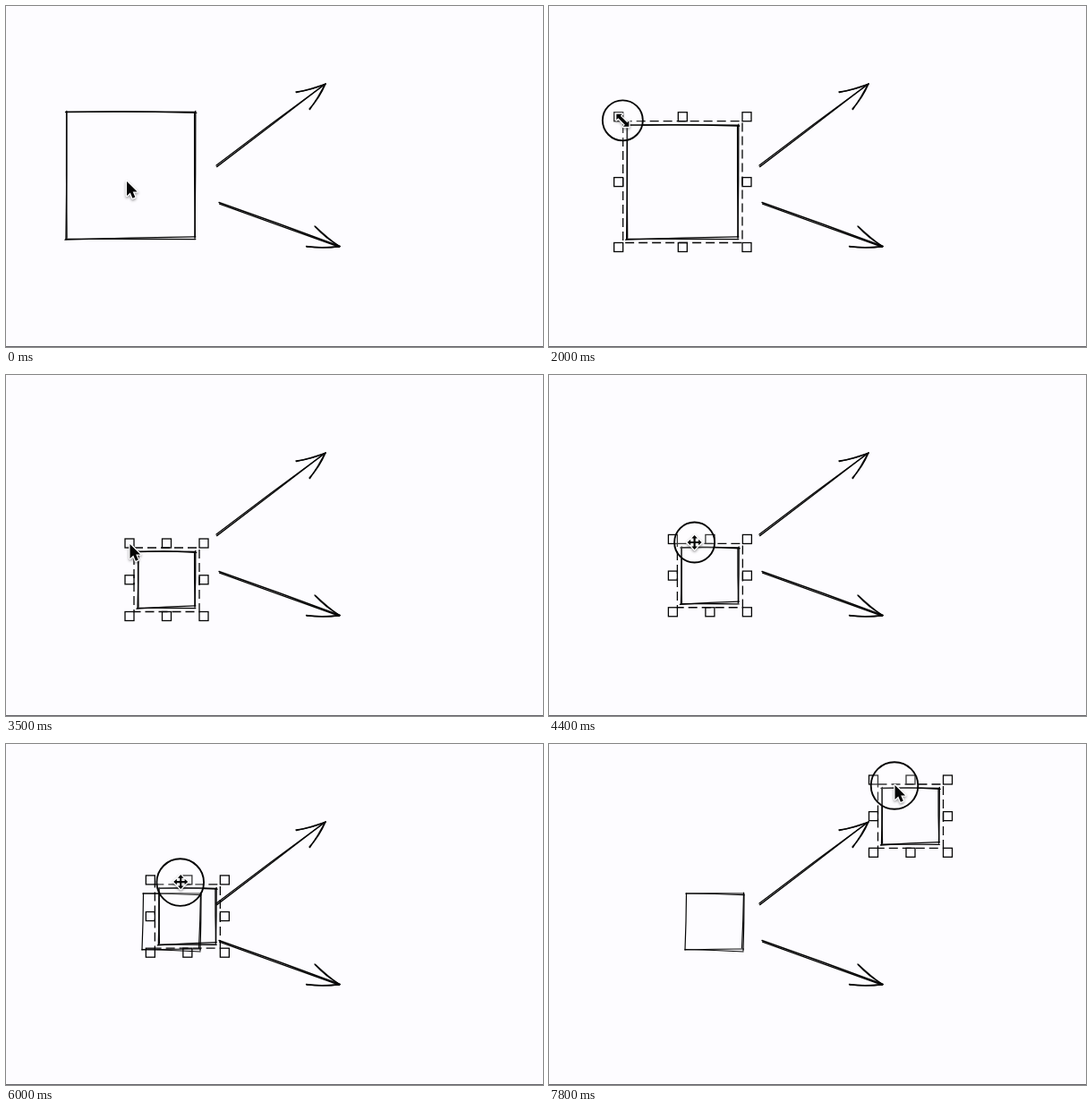
Write an HTML page with a canvas that moves like this. It is 600 px wide and 381 px high and loops after 8 s.

```html
<!DOCTYPE html>
<html lang="en">
<head>
<meta charset="utf-8">
<title>Sketch editor</title>
<style>
html, body { margin: 0; width: 100%; height: 100%; overflow: hidden; background: #fdfcff; }
canvas { display: block; width: 600px; height: 381px; }
</style>
</head>
<body>
<canvas id="stage" width="600" height="381"></canvas>
<script>
const ctx = document.getElementById('stage').getContext('2d');
const LOOP = 8000, STEP = 100, LAG = 35;
const PAPER = '#fdfcff', INK = '#050505';

// Pointer moves: leave and arrive in ms, then where to
const moves = [
  [200, 1000, 67, 174],
  [1000, 1100, 67, 136],
  [1100, 1500, 58.5, 110],
  [1800, 2400, 130, 163.5],
  [2400, 2900, 138, 186],
  [3200, 3300, 138.5, 189],
  [3600, 3900, 172, 176],
  [3900, 4200, 162, 194],
  [4300, 4800, 165, 159],
  [4900, 5100, 167, 165],
  [5900, 6600, 364.5, 88.5],
  [6600, 6800, 393, 62],
  [6800, 7000, 379, 47],
  [7500, 7750, 386.5, 46]
];

function pointerAt(t) {
  let x = 135, y = 196;
  for (const [leave, arrive, toX, toY] of moves) {
    if (t <= leave) break;
    const k = Math.min(1, (t - leave) / (arrive - leave));
    x += (toX - x) * k;
    y += (toY - y) * k;
  }
  return [x, y];
}

const within = (t, a, b) => t >= a && t < b;

// The frame trails the pointer: first resized by its corner, then moved whole
function frameAt(t) {
  if (t < 1800) return [58, 109, 221, 269.5];
  const [x, y] = pointerAt(Math.min(t, 4300) === t ? Math.min(t - LAG, 3400) : t - LAG);
  if (t < 4300) return [x - 0.5, y - 1, 221, 269.5];
  return [x - 24, y - 6, x + 59, y + 75.3];
}

// A slightly bowed pen stroke
function stroke(x0, y0, x1, y1, bow = 0.5) {
  const dx = x1 - x0, dy = y1 - y0, len = Math.hypot(dx, dy) || 1;
  ctx.beginPath();
  ctx.moveTo(x0, y0);
  ctx.quadraticCurveTo((x0 + x1) / 2 + dy / len * bow, (y0 + y1) / 2 - dx / len * bow, x1, y1);
  ctx.stroke();
}

function pen(width = 1.35) {
  ctx.strokeStyle = INK;
  ctx.lineWidth = width;
  ctx.lineCap = 'round';
}

function sketchArrow(x0, y0, x1, y1, wings) {
  pen();
  stroke(x0, y0, x1, y1, 0.8);
  stroke(x0 + 0.6, y0 + 1.6, x1 - 1, y1 + 0.5, -0.3);
  for (const [x, y] of wings) {
    stroke(x, y, x1, y1, -3);
    stroke(x + 0.5, y + 0.6, x1 - 0.5, y1 + 0.5, -1);
  }
}

function sketchBox(l, t, r, b) {
  pen();
  stroke(l - 0.5, t + 0.5, r + 1.5, t + 1.3, 1.5);
  stroke(l + 1.5, t + 0.3, r, t + 0.5, 1);
  stroke(r + 0.5, t - 0.5, r - 0.3, b - 1);
  stroke(r - 0.7, t + 1, r, b - 2, -0.6);
  stroke(r + 0.5, b - 2.3, l - 1, b + 1, -1);
  stroke(l, b + 0.2, r + 0.5, b + 0.4, 0.4);
  stroke(l + 0.8, t - 0.5, l, b + 0.5, 0.8);
  stroke(l + 0.6, t + 1, l + 1, b - 1, -0.5);
}

function sourceBox(l, t, r, b) {
  pen(1.2);
  stroke(l, t, r, t);
  stroke(l, t, r, t + 1.7);
  stroke(r - 0.5, t - 1, r - 2.5, b - 2);
  stroke(r, t + 1, r - 1, b + 1);
  stroke(l - 1, b, r - 0.5, b - 1);
  stroke(l - 1, b - 0.5, r - 1, b + 2);
  stroke(l + 0.5, t, l - 1, b);
}

function selection(l, t, r, b) {
  ctx.strokeStyle = INK;
  ctx.lineWidth = 1.3;
  ctx.lineCap = 'butt';
  ctx.setLineDash([10, 5]);
  ctx.strokeRect(l + 5, t + 5, r - l - 10, b - t - 10);
  ctx.setLineDash([]);
  const mx = (l + r) / 2, my = (t + b) / 2;
  for (const x of [l, mx, r])
    for (const y of [t, my, b])
      if (x !== mx || y !== my) ctx.strokeRect(x - 5, y - 5, 10, 10);
}

const icons = {
  arrow: new Path2D('M0 0V16L3.8 12.6L6.4 18.8L9.3 17.6L6.7 11.5H11.6Z'),
  move: new Path2D('M0-8L3.3-4.4H1.1V-1.1H4.4V-3.3L8 0L4.4 3.3V1.1H1.1V4.4H3.3L0 8L-3.3 4.4H-1.1V1.1H-4.4V3.3L-8 0L-4.4-3.3V-1.1H-1.1V-4.4H-3.3Z'),
  resize: new Path2D('M-7-7H-.5L-2.5-5L5 2.5L7 .5V7H.5L2.5 5L-5-2.5L-7-.5Z')
};

function drawPointer(name, x, y) {
  ctx.save();
  ctx.translate(x, y);
  ctx.lineJoin = 'round';
  ctx.lineWidth = 2.6;
  ctx.strokeStyle = '#fff';
  ctx.shadowColor = 'rgba(0,0,0,.4)';
  ctx.shadowBlur = 3;
  ctx.shadowOffsetY = 1.5;
  ctx.stroke(icons[name]);
  ctx.shadowColor = 'transparent';
  ctx.fillStyle = INK;
  ctx.fill(icons[name]);
  ctx.restore();
}

function pressRing(x, y, r) {
  ctx.beginPath();
  ctx.arc(x, y, r, 0, Math.PI * 2);
  ctx.fillStyle = 'rgba(253,252,255,.2)';
  ctx.fill();
  ctx.strokeStyle = INK;
  ctx.lineWidth = 1.9;
  ctx.stroke();
}

function pointerName(t) {
  if (t < 800 || within(t, 3400, 4200) || t >= 6100) return 'arrow';
  return within(t, 1400, 3400) ? 'resize' : 'move';
}

function draw(t) {
  ctx.fillStyle = PAPER;
  ctx.fillRect(0, 0, 600, 381);
  ctx.fillStyle = '#65646a';
  ctx.fillRect(0, 380, 600, 1);

  sketchArrow(235, 178, 357, 87, [[324, 96], [339, 115]]);
  sketchArrow(238, 219.5, 373, 268.5, [[335.5, 268.5], [345, 246]]);
  if (t >= 6000) sourceBox(153, 167, 218, 230);

  const [l, top, r, b] = frameAt(t);
  sketchBox(l + 9, top + 9, r - 9.7, b - 9.3);
  if (t >= 900) selection(l, top, r, b);

  const [x, y] = pointerAt(t);
  if (within(t, 1800, 3400) || within(t, 4400, 5500)) pressRing(x, y, 22.5);
  else if (t >= 6000) pressRing(x - 0.5, y + 0.5, 26.3);
  drawPointer(pointerName(t), x, y);
}

const start = performance.now();
function tick() {
  const t = (performance.now() - start) % LOOP;
  draw(Math.floor(t / STEP) * STEP);
  requestAnimationFrame(tick);
}
tick();
</script>
</body>
</html>
```
